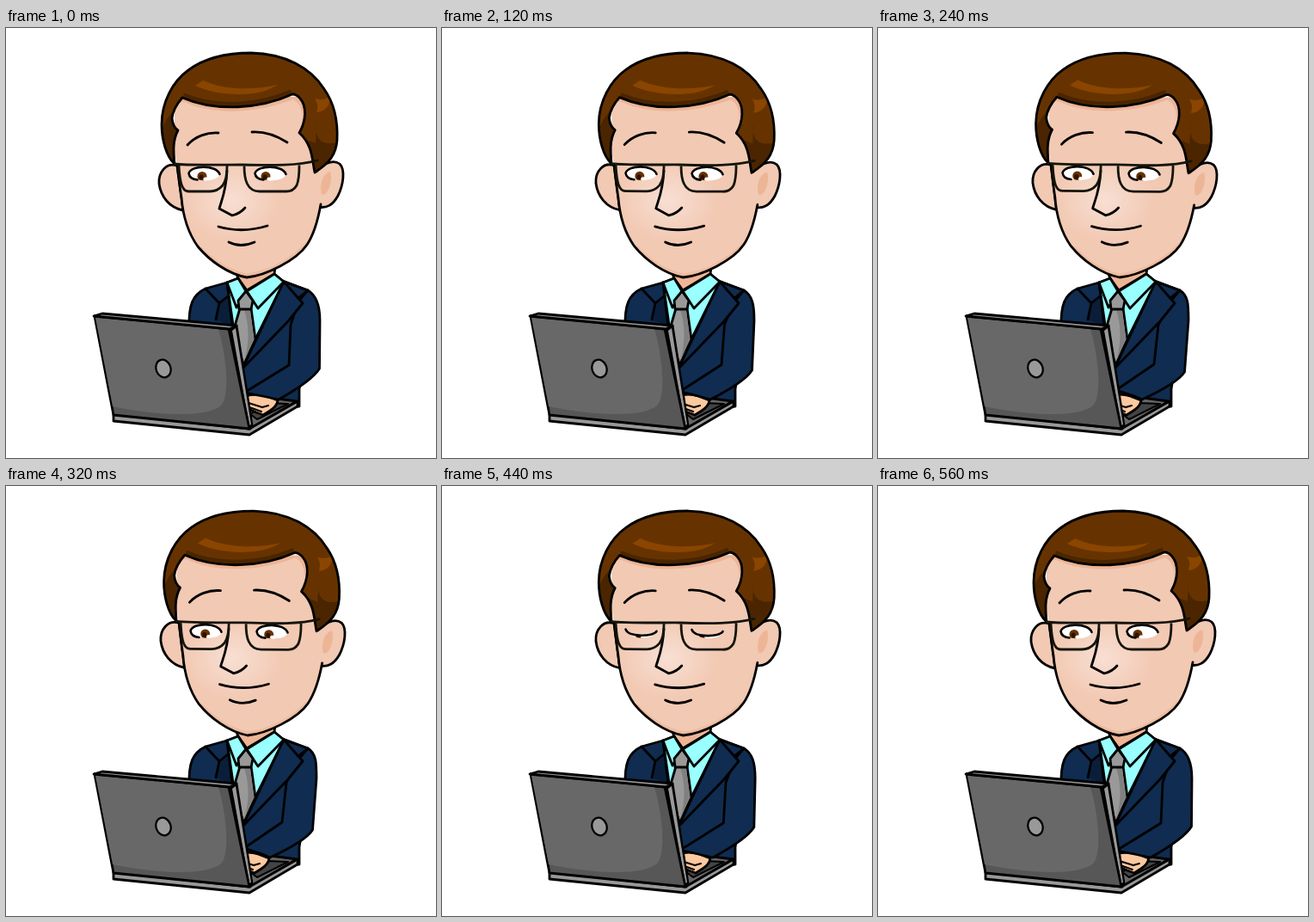
Write an HTML page that moves like this. It is 500 px wide and 500 px high and loops after 600 ms.

```html
<!DOCTYPE html>
<html lang="en">
<head>
<meta charset="utf-8">
<title>Typing at a laptop</title>
<style>
  html, body { margin: 0; width: 100%; height: 100%; overflow: hidden; background: #fff; }
  svg { display: block; width: 100vw; height: 100vh; }
  .ink { stroke: #000; stroke-width: 2.8; stroke-linejoin: round; stroke-linecap: round; }
  .line { fill: none; }
  .skin { fill: #f2c9b3; }
  .shade { fill: #edb596; }
  .suit { fill: #102c50; }
  .shirt { fill: #99ffff; }
  .grey { fill: #999; }
  .hair { fill: #663300; }
  .shine { fill: #8a4500; }
</style>
</head>
<body>
<svg viewBox="0 0 500 500">
  <defs>
    <radialGradient id="glow">
      <stop offset="0" stop-color="#f8dfd3"/>
      <stop offset="1" stop-color="#f2c9b3"/>
    </radialGradient>
    <clipPath id="faceClip"><use href="#face"/></clipPath>
    <clipPath id="hairClip"><use href="#hair"/></clipPath>
  </defs>

  <path class="ink suit" d="M257 296L232 303C217 310 212 322 213 350L260 440H341V420L354 340L351 305L322 294Z"/>
  <path fill="#0a1e3a" d="M247 320L259 312L264 346L245 340Z"/>
  <path class="ink" fill="#666" d="M270 445L300 429L338 434L286 465Z"/>
  <path class="ink" fill="#444" d="M284 449L304 436L328 437L292 455Z" style="stroke-width:2"/>
  <g id="hand">
    <path class="ink" fill="#fcc9a0" d="M278 428Q292 424 303 428L316 433Q315 440 307 445L299 450L291 447L280 442Z"/>
    <path class="ink line" style="stroke-width:2.2" d="M282 436L298 441M283 441L297 446M298 441L305 439"/>
  </g>
  <path class="ink suit" id="arm"/>

  <path class="ink shirt" d="M257 296L270 291L280 306L312 286L323 295L275 392L264 345Z"/>
  <path class="ink shade" d="M267 284L270 291L280 305L312 286L313 278Z"/>
  <path class="ink grey" d="M272 326H285L290 362L276 392L265 350Z"/>
  <path fill="#808080" d="M284 328L288 361L277 388Q286 355 277 328Z"/>
  <path class="ink shirt" d="M257 296L270 291L279 306L268 325ZM312 286L323 295L293 326L280 306Z"/>
  <path class="ink grey" d="M279 306L287 317L285 327H271L270 317Z"/>
  <path class="ink suit" d="M323 295L345 320L328 341L275 396Z"/>
  <path class="ink line" d="M323 295L351 305L340 314M232 303L248 320L258 312M248 320L244 339M257 296L263 346"/>

  <g id="head">
    <path class="ink skin" d="M199 160C186 156 177 168 178 181C180 196 190 209 206 212Z"/>
    <path class="ink skin" d="M357 172C366 158 380 152 388 158C395 165 392 183 386 195C380 206 373 210 362 208Z"/>
    <path class="shade" d="M377 167C369 169 364 181 367 193C373 198 381 178 377 167Z"/>
    <path id="face" class="skin" d="M196 80V145C200 160 201 180 204 197C206 222 213 240 223 254C236 270 258 286 280 290C302 288 338 270 350 252C358 240 363 222 366 200L360 160L350 80Z"/>
    <g clip-path="url(#faceClip)">
      <ellipse cx="262" cy="200" rx="58" ry="48" fill="url(#glow)"/>
      <path class="line" stroke="#edb596" stroke-width="7" opacity=".65" d="M225 257Q250 283 280 289Q320 284 351 252"/>
      <path class="shade" d="M193 100Q200 84 207 86C245 103 295 98 334 83Q346 90 344 108L350 70H195Z"/>
    </g>
    <path class="ink line" d="M199 160C201 175 202 185 204 197C206 222 213 240 223 254C236 270 258 286 280 290C302 288 338 270 350 252C358 240 363 222 366 205"/>
    <path id="hair" class="hair" d="M196 158C186 149 181 129 181 112C181 86 194 62 212 49C232 34 258 29 285 29C325 30 354 46 370 71C382 88 386 108 385 130C384 147 376 157 359 168C356 155 357 136 341 122C349 108 350 91 342 82Q338 77 333 77C296 94 244 98 205 81C198 89 194 96 193 105Q194 115 200 119C193 132 195 146 196 158Z"/>
    <g clip-path="url(#hairClip)">
      <path class="line" stroke="#4a2500" stroke-width="12" d="M205 81C244 98 296 94 333 77"/>
      <path fill="#4a2500" d="M180 122Q185 105 194 98L202 119L198 160H180ZM361 109C358 128 366 139 388 132V170H357L350 130L360 134Z"/>
      <path class="shine" d="M229 61C255 73 290 72 316 66C302 75 286 77 270 77C250 77 232 73 220 67ZM378 78C372 84 365 84 359 82C363 88 363 92 361 98C369 98 377 92 378 78Z"/>
    </g>
    <use href="#hair" class="ink" style="fill-opacity:0"/>
    <g id="eyes"></g>
    <path class="ink line" d="M211 136C220 126 234 121 247 122M286 121C302 120 316 126 327 133"/>
    <path class="ink line" d="M257 166C256 190 250 202 248 210L263 218Q272 216 278 209M247 231Q275 239 304 230M259 249Q273 256 289 249"/>
    <path class="ink line" style="stroke:#15150a" d="M196 158C210 160 250 159 275 159C310 160 340 160 362 154M201 160C202 176 203 182 206 186Q208 190 213 190H237Q246 190 252 183Q257 176 257 161M277 160C277 176 280 190 295 190H326Q334 190 338 183Q341 176 341 160"/>
  </g>

  <path class="ink grey" d="M125 449L283 466L339 434V440L283 473L125 457Z"/>
  <path class="ink" d="M259 350L268 346L286 462L284 466Z"/>
  <path class="grey" d="M263 352L267 349L285 461L283 462Z"/>
  <path class="ink" fill="#575757" d="M103 335L259 350L283 466L125 450Z"/>
  <path fill="#686868" d="M104 337L247 350C256 380 261 428 250 439C232 455 165 449 124 440Z"/>
  <path class="ink grey" d="M102 335L112 332L268 346L260 350Z"/>
  <ellipse class="ink grey" style="stroke-width:2.3" cx="183" cy="396" rx="8.5" ry="10.5" transform="rotate(-20 183 396)"/>
</svg>
<script>
  const LOOP = 600, STEP = 40;
  const el = id => document.getElementById(id);

  // Linear interpolation through [time, value] pairs
  function track(t, keys) {
    const i = keys.findIndex(k => k[0] >= t);
    if (i < 0) return keys[keys.length - 1][1];
    if (i === 0) return keys[0][1];
    const [t0, a] = keys[i - 1], [t1, b] = keys[i];
    return a + (b - a) * (t - t0) / (t1 - t0);
  }

  const armKeys = [[0, 0], [240, 1], [320, 1], [360, .5], [480, .06], [560, 0]];
  const handKeys = [[0, 0], [240, 1], [320, 1], [360, .6], [480, .3], [560, .12]];
  const lidKeys = [[320, 0], [360, .5], [400, .95], [440, 1], [480, .75], [560, 0]];

  function eye(id, x, iris, lid) {
    const left = `${x - 18} ${169 - lid * 2}`;
    const lidY = 159 + lid * 17;
    const top = `M${left}C${x - 15} ${lidY} ${x + 14} ${lidY} ${x + 18} ${170 - lid}`;
    const shape = `${top}C${x + 17} 180 ${x - 15} 180 ${left}Z`;
    const rim = lid < .9 ? `M${left}Q${x - 17} 176 ${x - 8} 176.5` : '';
    return `<clipPath id="${id}"><path d="${shape}"/></clipPath>
      <g clip-path="url(#${id})">
        <path fill="#fff" d="${shape}"/>
        <ellipse cx="${iris}" cy="172.5" rx="5.5" ry="5.5" fill="#663300"/>
        <ellipse cx="${iris - 1}" cy="173.5" rx="2.5" ry="3" fill="#2a1200"/>
        <circle cx="${iris + 4}" cy="176" r="2.6" fill="#fff"/>
      </g>
      <path class="ink line" style="stroke-width:2.6" d="${top}${rim}"/>`;
  }

  function draw(t) {
    const sway = Math.min(t, 560 - t) / 280;
    el('head').setAttribute('transform', `translate(${sway} 0) rotate(${sway * .65} 280 290)`);

    const lid = track(t, lidKeys);
    el('eyes').innerHTML = eye('leftEye', 230.5, 228 + 2 * sway, lid) + eye('rightEye', 307.5, 302 + 2 * sway, lid);

    const k = track(t, armKeys);
    const side = 365 - 4 * k;
    el('arm').setAttribute('d', `M351 305C361 311 ${side} 322 ${side} 340L${364.5 - 8 * k} ${396 + 4 * k}` +
      `Q${356 - 8 * k} ${410 + 3 * k} ${317 - 10 * k} 432L298 428L277 ${424 - 3 * k}` +
      `L${329 - 8 * k} ${392 - k}L${331 - 5 * k} 345L340 318Z`);

    el('hand').setAttribute('transform', `translate(${-10 * track(t, handKeys)} 0)`);
  }

  function tick() {
    draw(Math.floor(performance.now() % LOOP / STEP) * STEP);
    requestAnimationFrame(tick);
  }
  tick();
</script>
</body>
</html>
```
